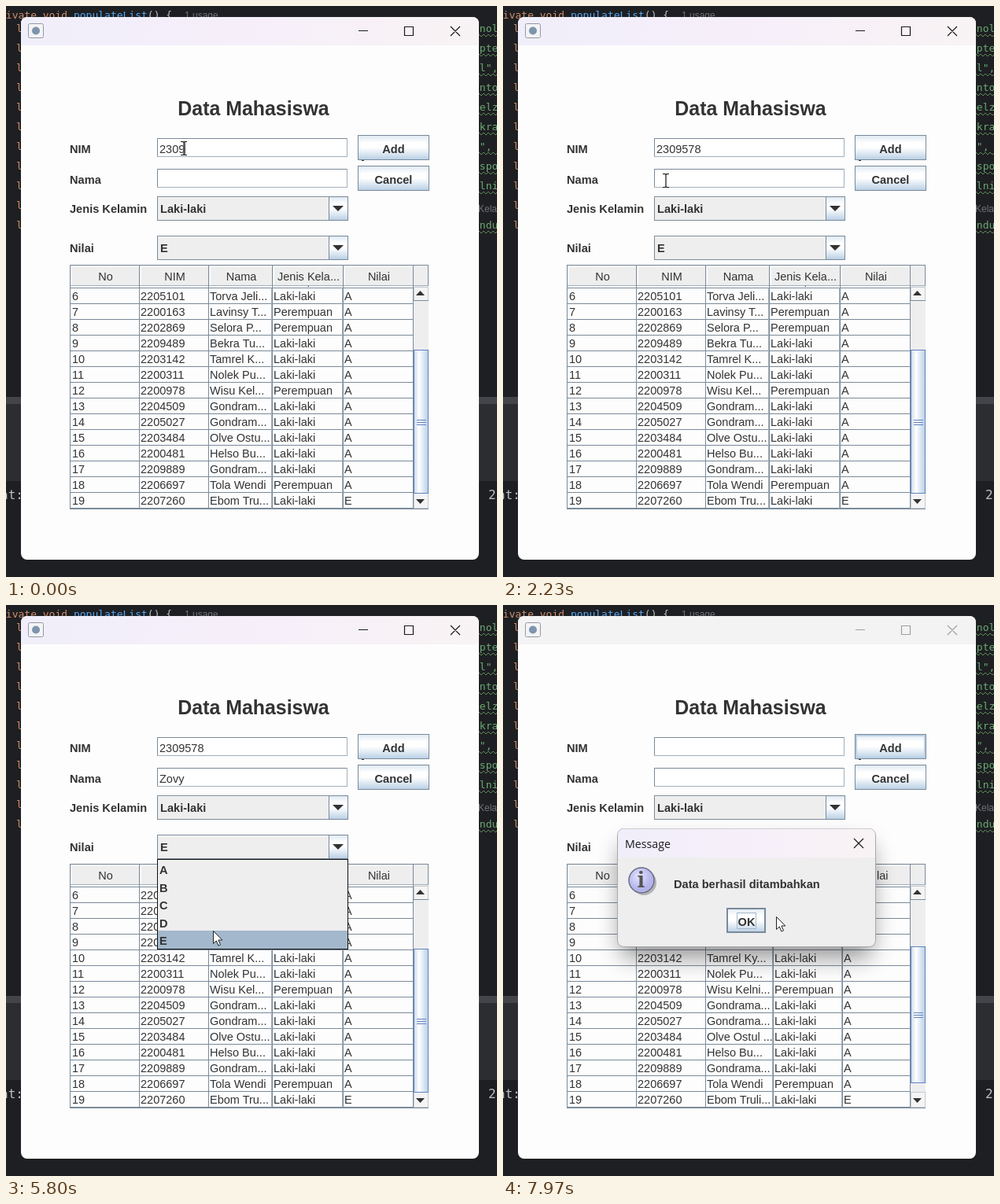
These frames come from a looping animation (624 by 726 pixels, 8000 ms). An HTML page:

```html
<!DOCTYPE html>
<html lang="id">
<head>
<meta charset="utf-8">
<title>Data Mahasiswa</title>
<style>
  html, body { margin: 0; width: 100%; height: 100%; overflow: hidden; background: #1e1f22; }
  svg { display: block; width: 624px; height: 726px; }
  text { font: 14.5px "Liberation Sans", Arial, sans-serif; fill: #333; white-space: pre; }
  .b { font-weight: bold; font-size: 14.6px; }
  .mono { font: 13px "DejaVu Sans Mono", monospace; }
  .mid { text-anchor: middle; }
</style>
</head>
<body>
<svg id="stage" viewBox="0 0 624 726" xmlns="http://www.w3.org/2000/svg"></svg>
<script>
const LOOP = 8000;
const INK = '#333', EDGE = '#7a8a99', PAPER = '#fdfdfd', PANEL = '#eee', BLUE = '#6382bf', PALE = '#b8cfe5';

const rect = (x, y, w, h, fill, extra = '') =>
  `<rect x="${x}" y="${y}" width="${w}" height="${h}" fill="${fill}" ${extra}/>`;
const box = (x, y, w, h, fill, stroke = EDGE, extra = '') =>
  rect(x + .5, y + .5, w - 1, h - 1, fill, `stroke="${stroke}" ${extra}`);
const text = (x, y, s, cls = '', extra = '') =>
  `<text x="${x}" y="${y}" class="${cls}" ${extra}>${s}</text>`;
const path = (d, stroke, extra = '') => `<path d="${d}" fill="none" stroke="${stroke}" ${extra}/>`;
const tri = (x, y) => `<path d="M${x - 7} ${y}h14l-7 7z" fill="${INK}"/>`;
const group = (id, body) => `<g id="${id}">${body}</g>`;
const cross = (x, y) => `M${x} ${y}l12 12m0 -12l-12 12`;

function backdrop() {
  let s = rect(0, 0, 624, 726, '#1e1f22') + rect(0, 506, 624, 98, '#2b2d30') + rect(0, 497, 624, 9, '#43454a');
  s += text(-8, 16, '<tspan fill="#cf8e6d">rivate void </tspan><tspan fill="#56a8f5">populateList</tspan>() {', 'mono', 'style="fill:#bcbec4"');
  s += text(227, 16, '1 usage', '', 'style="font-size:12px;fill:#6f737a"');
  const tails = ['enol', 'opte', 'ul",', 'unto', 'Belz', 'ekra', 'o",', 'uspo', 'elni', '', 'ondu'];
  tails.forEach((tail, i) => {
    const y = 33 + 25 * i;
    s += text(13, y, 'l', 'mono', 'style="fill:#cf8e6d"');
    if (!tail) { s += text(600, y + 4, 'Kela', '', 'style="font-size:12px;fill:#6f737a"'); return; }
    s += text(594, y, tail, 'mono', 'style="fill:#6aab73"');
    s += path(`M598 ${y + 6}` + 'l3 -3l3 3'.repeat(5), '#5f8a5a');
  });
  const log = 'style="font-size:16px;fill:#bcbec4"';
  return s + text(-7, 627, 'at:', 'mono', log) + text(613, 627, '2', 'mono', log);
}

function field(y) {
  return box(192, y, 242, 24, '#fff', '#a3b0bc') + path(`M192.5 ${y + 23}V${y + .5}H433`, EDGE);
}

function combo(y, value) {
  return box(192, y, 243, 31, PANEL) + rect(193, y + 1, 217, 1, '#fafafa') +
    box(410, y, 25, 31, 'url(#btn)') + tri(422, y + 12) + text(196, y + 21, value, 'b');
}

function button(x, y, w, h, label) {
  return box(x, y, w, h, 'url(#btn)') + text(x + w / 2, y + h / 2 + 7, label, 'b mid');
}

const people = [
  [2205101, 'Torva Jeli...', 'Torva Jelin...', 0],
  [2200163, 'Lavinsy T...', 'Lavinsy Te...', 1],
  [2202869, 'Selora P...', 'Selora Pu...', 1],
  [2209489, 'Bekra Tu...', 'Bekra Tul...', 0],
  [2203142, 'Tamrel K...', 'Tamrel Ky...', 0],
  [2200311, 'Nolek Pu...', 'Nolek Pu...', 0],
  [2200978, 'Wisu Kel...', 'Wisu Kelni...', 1],
  [2204509, 'Gondram...', 'Gondrama...', 0],
  [2205027, 'Gondram...', 'Gondrama...', 0],
  [2203484, 'Olve Ostu...', 'Olve Ostul ...', 0],
  [2200481, 'Helso Bu...', 'Helso Bu...', 0],
  [2209889, 'Gondram...', 'Gondrama...', 0],
  [2206697, 'Tola Wendi', 'Tola Wendi', 1],
  [2207260, 'Ebom Tru...', 'Ebom Truli...', 0]
];

function table(cols, nameCol, thumbTop, thumbEnd) {
  let s = box(81, 329, 456, 311, PAPER) + rect(82, 330, 454, 25, PANEL);
  s += `<g clip-path="url(#rows)">` + text(cols[2] + 2, 354, 'Perempuan') + '</g>';
  people.forEach((p, i) => {
    const y = 374 + 20 * i;
    const cells = [i + 6, p[0], p[nameCol], p[3] ? 'Perempuan' : 'Laki-laki', i == 13 ? 'E' : 'A'];
    const xs = [84, 171, ...cols.slice(1).map(x => x + 2)];
    s += cells.map((c, k) => text(xs[k], y, c)).join('');
    s += path(`M82 ${y + 4.5}H517`, EDGE);
  });
  s += path('M82 358.5H517', EDGE) + path('M82 355.5H536', '#a3b0bc');
  const edges = [81, ...cols, 517];
  ['No', 'NIM', 'Nama', 'Jenis Kela...', 'Nilai'].forEach((h, i) => {
    s += text((edges[i] + edges[i + 1]) / 2 + 1.5, 349, h, 'mid');
    s += path(`M${edges[i + 1] + .5} 330V639`, EDGE);
    s += path(`M${edges[i] + 2.5} 355V331.5H${edges[i + 1]}`, '#fff');
  });
  for (const x of cols.slice(2)) s += path(`M${x - .5} 358V639`, '#a3b0bc');
  const mid = Math.round((thumbTop + thumbEnd) / 2);
  s += rect(518, 356, 19, 283, PANEL) + box(518, 357, 19, 18, '#f4f4f4', '#c4cad0') + box(518, 619, 19, 20, '#f4f4f4', '#c4cad0');
  s += `<path d="M521 368h11l-5.500 -6z M521 627h11l-5.500 6z" fill="${INK}"/>`;
  s += path('M518 374.5H537', EDGE);
  s += box(518, thumbTop, 19, thumbEnd - thumbTop, 'url(#thumb)', BLUE);
  for (const d of [-3, 0, 3]) s += path(`M522 ${mid + d + .5}H534`, BLUE);
  return s;
}

function win() {
  const bar = 'M19 50V22a8 8 0 0 1 8 -8H593a8 8 0 0 1 8 8V50z';
  let s = rect(19, 14, 582, 690, PAPER, 'rx="8"') + `<path id="bar" d="${bar}"/>`;
  s += box(28, 22, 20, 19, '#f4f4f6', '#9299a3', 'rx="2"') + '<circle cx="38" cy="31.500" r="5" fill="#7d95ad"/>';
  s += group('controls', `<path d="M448 31.500h12M506.500 26.500h11v11h-11z${cross(565, 26)}" fill="none" stroke-width="1.2"/>`);
  s += text(314.5, 139, 'Data Mahasiswa', 'b mid', 'style="font-size:24.9px"');
  s += text(81, 187, 'NIM', 'b') + text(81, 226, 'Nama', 'b') + text(81, 263, 'Jenis Kelamin', 'b') + text(81, 313, 'Nilai', 'b');
  s += field(168) + field(207) + text(195, 187, '', '', 'id="nim"') + text(195, 226, '', '', 'id="nama"');
  s += combo(242, 'Laki-laki') + combo(292, 'E');
  s += rect(452, 195, 3, 2, INK) + button(447, 164, 91, 32, 'Add') + button(447, 203, 91, 32, 'Cancel');
  s += group('hover', rect(449, 166, 87, 28, 'none', `stroke="${PALE}" stroke-width="2"`));
  s += group('press', rect(447, 164, 91, 33, PALE) +
    rect(448, 165, 89, 31, 'none', `stroke="${EDGE}" stroke-width="2"`) +
    box(478, 173, 29, 18, 'none', '#a3b8cc') + text(492.5, 187, 'Add', 'b mid'));
  return s;
}

function popup() {
  let s = box(192, 323, 243, 115, PANEL, '#111');
  s += rect(193, 414, 241, 23, '#a3b8cc', 'id="pick"');
  return s + [...'ABCDE'].map((c, i) => text(195, 342 + 22.5 * i, c, 'b')).join('');
}

function dialog() {
  let s = rect(150, 304, 319, 144, '#000', 'rx="12" opacity=".42" filter="url(#blur)"');
  s += box(145, 284, 329, 151, PANEL, '#a8a8ac', 'rx="8"');
  s += `<path d="M146 321V292.500a8 8 0 0 1 8 -8H465a8 8 0 0 1 8 8V321z" fill="url(#title)"/>`;
  s += text(155, 309, 'Message', '', 'style="font:14.200px \'Open Sans\',sans-serif;fill:#1a1a1a"');
  s += path(cross(446, 297), '#1a1a1a', 'stroke-width="1.2"');
  s += '<circle cx="179" cy="353" r="16" fill="#777" opacity=".5"/>';
  s += '<circle cx="176" cy="350" r="16" fill="url(#orb)" stroke="#6c6c88" stroke-width="1.5"/>';
  s += text(175.5, 359, 'i', 'mid', 'style="font:bold 27px \'Noto Serif\',serif;fill:#555"');
  s += text(217, 360, 'Data berhasil ditambahkan', 'b');
  s += box(284, 385, 50, 32, 'url(#btn)') + rect(285, 386, 48, 30, 'none', `stroke="${EDGE}" stroke-width="2"`);
  return s + box(297, 391, 25, 21, 'none', '#a3b8cc') + text(309.5, 408, 'OK', 'b mid');
}

const stops = list => list.map(([o, c]) => `<stop offset="${o}" stop-color="${c}"/>`).join('');
const beamPath = 'M-4 -8.500h3l1 1l1 -1h3M0 -8V8M-4 8.500h3l1 -1l1 1h3';
const stage = document.getElementById('stage');
stage.innerHTML = `<defs>
  <linearGradient id="btn" x2="0" y2="1">${stops([[0, '#dde8f3'], [.3, '#fff'], [.5, '#fff'], [1, PALE]])}</linearGradient>
  <linearGradient id="thumb">${stops([[0, '#c8d9ea'], [.35, '#fff'], [1, PALE]])}</linearGradient>
  <linearGradient id="title">${stops([[0, '#f0eefa'], [.5, '#f6effa'], [1, '#f8f3f4']])}</linearGradient>
  <radialGradient id="orb" cx=".4" cy=".35">${stops([[0, '#e4e4ff'], [1, '#b4b4ea']])}</radialGradient>
  <filter id="blur" x="-30%" y="-50%" width="160%" height="200%"><feGaussianBlur stdDeviation="15"/></filter>
  <clipPath id="rows"><rect x="82" y="356" width="435" height="283"/></clipPath>
</defs>` + backdrop() + win() +
  group('before', table([169, 257, 338, 428], 1, 437, 620)) +
  group('after', table([169, 257, 343, 431], 2, 434, 608)) +
  group('popup', popup()) + group('dialog', dialog()) +
  rect(0, 0, 1, 16, INK, 'id="caret"') +
  group('beam', path(beamPath, '#fff', 'stroke-width="2.4" opacity=".6"') + path(beamPath, '#111', 'stroke-width="1.2"')) +
  group('arrow', '<path d="M.5 .5V16.500l3.800 -3.500l2.600 6l2.600 -1.100l-2.600 -5.900h5z" fill="#fff" stroke="#222"/>');

const el = {};
stage.querySelectorAll('[id]').forEach(n => el[n.id] = n);
const show = (id, on) => el[id].setAttribute('display', on ? 'inline' : 'none');
const move = (id, x, y) => el[id].setAttribute('transform', `translate(${x} ${y})`);

const nimKeys = [250, 600, 900];
const namaKeys = [2650, 2850, 3020, 3240];
const FOCUS = 1710, OPEN = 4850, PICK = 6120, PRESS = 7180, RELEASE = 7400, DONE = 7530;
const mouse = [
  [0, 226, 181], [300, 225, 181], [1150, 225, 181], [1650, 207, 222], [2300, 207, 222], [2700, 207, 221],
  [4150, 207, 221], [4700, 268, 308], [5000, 268, 308], [5700, 263, 414], [6200, 263, 414],
  [7000, 501, 184], [7530, 501, 184], [7930, 347, 396], [8000, 347, 396]
];

function mouseAt(t) {
  const i = mouse.findIndex(k => k[0] > t);
  const [t0, x0, y0] = mouse[i - 1], [t1, x1, y1] = mouse[i];
  const u = (t - t0) / (t1 - t0), e = u * u * (3 - 2 * u);
  return [x0 + (x1 - x0) * e, y0 + (y1 - y0) * e];
}

const typed = (s, base, keys, t) => s.slice(0, base + keys.filter(k => k <= t).length);

function draw(t) {
  const done = t >= DONE;
  const [x, y] = mouseAt(t);
  el.nim.textContent = done ? '' : typed('2309578', 4, nimKeys, t);
  el.nama.textContent = done ? '' : typed('Zovy', 0, namaKeys, t);

  const inNama = t >= FOCUS;
  const last = Math.max(0, ...[...nimKeys, FOCUS, ...namaKeys].filter(k => k <= t));
  const active = inNama ? el.nama : el.nim;
  el.caret.setAttribute('x', 195 + Math.round(active.getComputedTextLength()));
  el.caret.setAttribute('y', inNama ? 212 : 173);
  show('caret', t < OPEN && Math.floor((t - last) / 500) % 2 === 0);

  show('popup', t >= OPEN && t < PICK);
  const item = y < 324 ? 4 : Math.min(4, Math.floor((y - 323.5) / 22.6));
  el.pick.setAttribute('y', 324 + 22.5 * item);

  const overAdd = x > 447 && x < 538 && y > 164 && y < 196;
  show('hover', overAdd || done);
  show('press', t >= PRESS && t < RELEASE);
  show('before', !done);
  show('after', done);
  show('dialog', done);
  el.bar.setAttribute('fill', done ? '#f3f3f3' : 'url(#title)');
  el.controls.setAttribute('stroke', done ? '#a0a0a0' : '#1a1a1a');

  const beam = !done && x > 192 && x < 433 && (y > 168 && y < 192 || y > 207 && y < 231);
  show('beam', beam);
  show('arrow', !beam);
  move('beam', x, y);
  move('arrow', x, y);
}

const start = performance.now();
function tick() {
  draw((performance.now() - start) % LOOP);
  requestAnimationFrame(tick);
}
tick();
</script>
</body>
</html>
```
